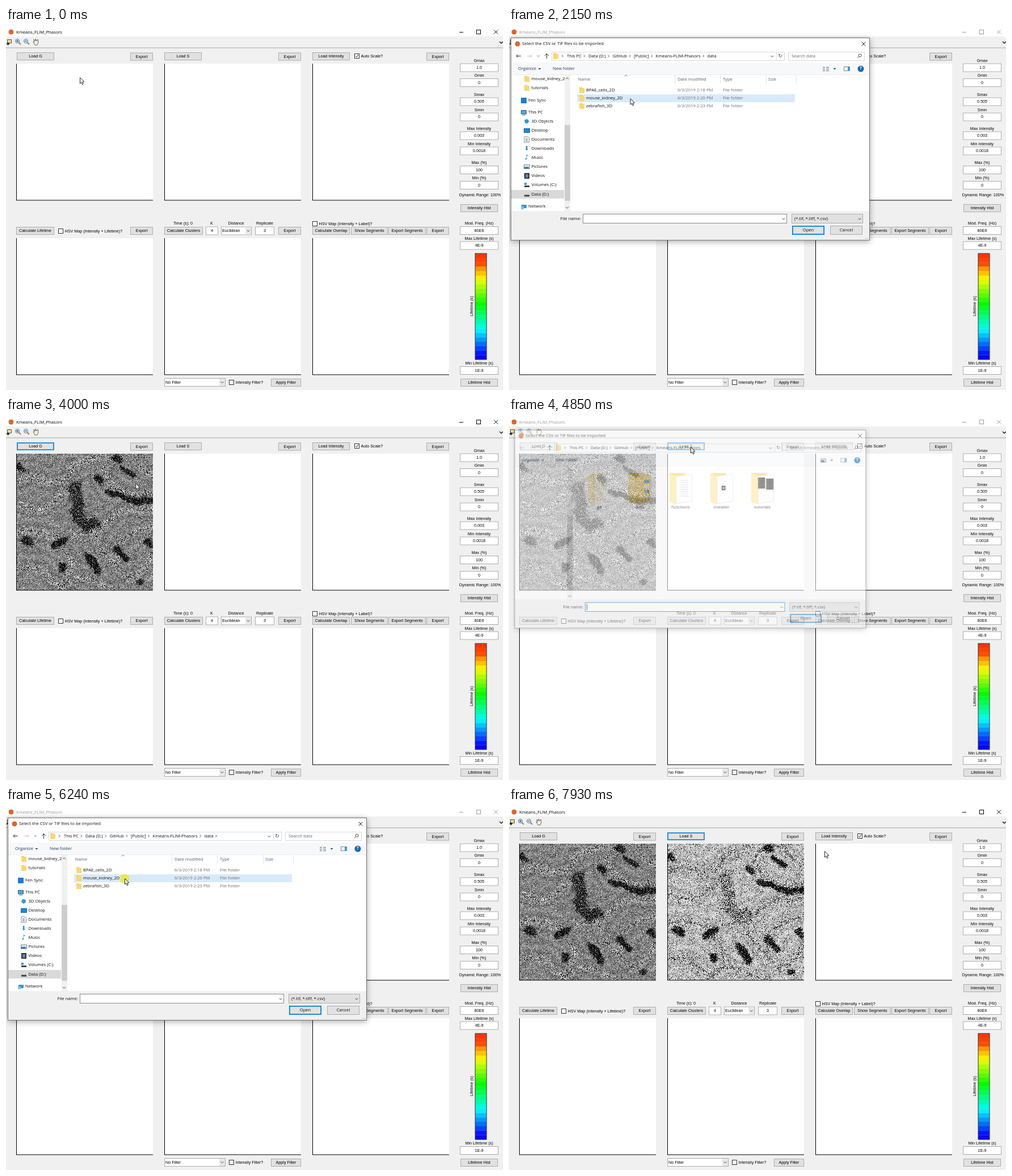
These frames come from a looping animation (876 px wide and 639 px high, 8000 ms). An HTML page with a canvas:

```html
<!DOCTYPE html>
<html lang="en">
<head>
<meta charset="utf-8">
<title>Kmeans_FLIM_Phasors</title>
<style>
html, body { margin: 0; width: 100%; height: 100%; overflow: hidden; background: #f0f0f0; }
canvas { display: block; }
</style>
</head>
<body>
<canvas id="stage" width="876" height="639"></canvas>
<script>
const LOOP = 8000;
const UI = '7.2px "Liberation Sans", Arial, sans-serif';
const SHELL = '7.65px "Open Sans", "Noto Sans", sans-serif';
const stage = document.getElementById('stage').getContext('2d');
const newLayer = (w, h = w) => Object.assign(document.createElement('canvas'), { width: w, height: h });
const layer = newLayer(876, 639);
let c = stage;

// ---------- drawing helpers ----------
function box(x, y, w, h, fill, stroke, lw = 1) {
  if (fill) { c.fillStyle = fill; c.fillRect(x, y, w, h); }
  if (stroke) {
    c.strokeStyle = stroke; c.lineWidth = lw;
    c.strokeRect(x + lw / 2, y + lw / 2, w - lw, h - lw);
  }
}
function text(s, x, y, { font = UI, align = 'left', color = '#000' } = {}) {
  c.font = font; c.textAlign = align; c.textBaseline = 'middle'; c.fillStyle = color;
  c.fillText(s, x, y);
}
const shell = (s, x, y, color = '#111', align = 'left') => text(s, x, y, { font: SHELL, color, align });
const glyph = (s, x, y, color, size = 9) =>
  text(s, x, y, { font: size + 'px "DejaVu Sans", sans-serif', align: 'center', color });
function path(points, stroke, fill, lw = 1) {
  c.beginPath();
  points.forEach(([x, y]) => c.lineTo(x, y));
  if (fill) { c.closePath(); c.fillStyle = fill; c.fill(); }
  if (stroke) { c.strokeStyle = stroke; c.lineWidth = lw; c.stroke(); }
}
function disc(x, y, r, fill, stroke) {
  c.beginPath(); c.arc(x, y, r, 0, 7);
  if (fill) { c.fillStyle = fill; c.fill(); }
  if (stroke) { c.strokeStyle = stroke; c.lineWidth = 1; c.stroke(); }
}
const down = (x, y, color = '#444', s = 2.5) => path([[x - s, y - s / 2], [x, y + s / 2], [x + s, y - s / 2]], color);
const up = (x, y, color) => down(x, y, color, -2.5);
const cross = (x, y, color) => {
  path([[x - 3.5, y - 3.5], [x + 3.5, y + 3.5]], color);
  path([[x + 3.5, y - 3.5], [x - 3.5, y + 3.5]], color);
};

// ---------- tissue images ----------
const tubules = [
  [104, 56, 107, 102, 14], [107, 102, 122, 130, 14], [122, 130, 140, 122, 12],
  [142, 43, 146, 45, 9], [5, 24, 8, 27, 9],
  [176, 7, 183, 13, 8], [188, 28, 203, 36, 7], [163, 66, 190, 78, 7], [196, 80, 241, 84, 8],
  [14, 153, 26, 158, 9], [70, 164, 84, 152, 9], [80, 199, 81, 203, 9], [125, 184, 144, 206, 10],
  [177, 168, 190, 186, 8], [231, 154, 238, 162, 7], [215, 222, 221, 226, 6]
];
const seams = [
  [0, 90, 20, 97, 50, 95, 75, 80, 88, 70],
  [0, 52, 30, 38, 62, 52, 85, 45, 100, 20, 130, 12, 150, 0],
  [135, 135, 145, 160, 172, 195, 195, 220, 225, 205, 238, 180],
  [150, 28, 170, 60, 200, 72, 241, 72],
  [150, 28, 165, 10, 205, 0, 225, 30, 241, 45],
  [0, 140, 40, 135, 70, 150, 95, 185, 100, 215, 70, 241],
  [95, 140, 135, 140, 165, 115, 200, 95, 241, 100],
  [0, 205, 40, 200, 75, 235],
  [172, 195, 180, 160, 205, 135, 241, 130],
  [100, 215, 140, 225, 170, 241]
].flatMap(p => p.slice(0, -2).flatMap((_, i) => i % 2 ? [] : [p.slice(i, i + 4)]));

function segmentDistance(x, y, [x1, y1, x2, y2]) {
  const dx = x2 - x1, dy = y2 - y1;
  const u = Math.max(0, Math.min(1, ((x - x1) * dx + (y - y1) * dy) / (dx * dx + dy * dy)));
  return Math.hypot(x - x1 - u * dx, y - y1 - u * dy);
}
function tissue(size, shade) {
  const canvas = newLayer(size), g = canvas.getContext('2d'), img = g.createImageData(size, size);
  let seed = 7;
  const rand = () => (seed = (seed * 1664525 + 1013904223) >>> 0) / 2 ** 32;
  for (let i = 0; i < size * size; i++) {
    const x0 = i % size * 241 / size, y0 = Math.floor(i / size) * 241 / size;
    const x = x0 + 2.5 * Math.sin(y0 / 8) + Math.sin(y0 / 3), y = y0 + 2.5 * Math.sin(x0 / 9) + Math.sin(x0 / 3.5);
    let dark = 0, large = false;
    tubules.forEach((tube, n) => {
      const d = Math.min(1, Math.max(0, 1.8 * (1 - segmentDistance(x, y, tube) / tube[4])));
      if (d > dark) { dark = d; large = n < 3; }
    });
    const seam = Math.min(...seams.map(s => segmentDistance(x, y, s)));
    img.data.fill(shade({ dark, large, seam, rand }), i * 4, i * 4 + 3);
    img.data[i * 4 + 3] = 255;
  }
  g.putImageData(img, 0, 0);
  return canvas;
}
const grain = rand => rand() + rand() - 1;
const imageG = tissue(241, ({ dark, large, seam, rand }) => {
  if (rand() < dark * (large ? 0.7 : 0.85)) return 35 * rand();
  const r = rand(), speckle = 0.04 + 0.3 * Math.exp(-seam / 3.5);
  if (r < speckle) return 40 * rand();
  if (r > 1 - speckle) return 210 + 45 * rand();
  return 130 + 12 * Math.sin(seam / 2.5) + 70 * grain(rand);
});
const imageS = tissue(241, ({ dark, large, seam, rand }) => {
  if (rand() < dark * (large ? 0.33 : 0.88)) return 30 * rand();
  if (rand() < 0.08 + 0.32 * Math.exp(-seam / 4)) return 60 * rand();
  return 195 + 12 * Math.sin(seam / 2.5) + 85 * grain(rand);
});
const thumbG = tissue(62, ({ dark, seam, rand }) => 165 - 115 * dark + (seam < 4 ? 25 : 0) + 45 * grain(rand));
const thumbS = tissue(62, ({ dark, seam, rand }) => 125 - 80 * dark - (seam < 4 ? 20 : 0) + 40 * grain(rand));
const thumbI = tissue(62, ({ dark, large, rand }) => large ? 255 : 255 - dark * (190 + 60 * grain(rand)));

// ---------- timing ----------
const runs = [
  { block: 1070, open: 1220, folder: 2060, crumb: 2380, files: 2770, hover: 3230, pick: 3460, active: 3620, close: 3690, end: 3850, file: 1 },
  { block: 4690, open: 4790, folder: 5640, crumb: 5850, files: 6310, hover: 6900, pick: 7310, active: 7465, close: 7545, end: 7705, file: 5 }
];
const pointer = [
  [70, 130, 87], [600, 58, 46], [1220, 58, 46], [1360, 110, 78], [1650, 214, 122], [2060, 214, 124],
  [2400, 211, 125], [3000, 211, 127], [3850, 211, 127], [4450, 320, 51], [4900, 320, 51], [5450, 214, 122],
  [5700, 209, 124], [6400, 209, 124], [7000, 510, 135], [7080, 512, 135], [7640, 512, 135], [7930, 556, 76]
];
const YELLOW = 'rgba(240,228,40,.75)', AMBER = 'rgba(245,195,45,.75)';
const clicks = [
  [680, 820, YELLOW], [1700, 1830, YELLOW], [1900, 2060, AMBER], [2460, 2610, YELLOW], [3460, 3680, AMBER],
  [4480, 4620, YELLOW], [5480, 5640, AMBER], [6230, 6310, YELLOW], [7310, 7540, AMBER]
];
function pointerAt(t) {
  const i = pointer.findIndex(k => k[0] > t);
  if (i === 0) return pointer[0].slice(1);
  if (i < 0) return pointer.at(-1).slice(1);
  const [t1, x1, y1] = pointer[i - 1], [t2, x2, y2] = pointer[i];
  const u = (t - t1) / (t2 - t1), e = u * u * (3 - 2 * u);
  return [x1 + (x2 - x1) * e, y1 + (y2 - y1) * e];
}
const within = ([x, y], x1, y1, x2, y2) => x >= x1 && x <= x2 && y >= y1 && y <= y2;

// ---------- main window ----------
function button(label, x, y, w, mode) {
  box(x, y, w, 14, mode === 'hover' ? '#e5f1fb' : '#e1e1e1', mode ? '#2b8fdb' : '#adadad', mode === 'focus' ? 2 : 1);
  text(label, x + w / 2, y + 7.5, { align: 'center' });
}
function field(label, x, y, w) {
  box(x, y, w, 15, '#fff', '#ababab');
  text(label, x + w / 2, y + 8, { align: 'center' });
}
function select(label, x, y, w) {
  box(x, y, w, 15, '#fff', '#adadad');
  box(x + w - 11, y + 1, 10, 13, '#e8e8e8');
  down(x + w - 6, y + 7.5);
  text(label, x + 2, y + 8);
}
function checkbox(label, x, y, checked) {
  box(x, y, 9, 9, '#fff', '#333');
  if (checked) path([[x + 2, y + 4.5], [x + 4, y + 6.5], [x + 7, y + 2]], '#222');
  text(label, x + 11.5, y + 5);
}
const caption = (s, x, y) => text(s, x, y, { align: 'center' });

const settings = [
  ['Gmax', '1.0', 58], ['Gmin', '0', 84.5], ['Smax', '0.505', 118], ['Smin', '0', 145],
  ['Max Intensity', '0.003', 178], ['Min Intensity', '0.0018', 205], ['Max (%)', '100', 238.5], ['Min (%)', '0', 265.5],
  ['Mod. Freq. (Hz)', '80E6', 345.5], ['Max Lifetime (s)', '4E-9', 372], ['Min Lifetime (s)', '1E-9', 592.5]
];

function mainWindow(t, run, at) {
  const ink = t >= run.block && t < run.active ? '#999' : '#000';
  box(0, 0, 876, 639, '#f0f0f0');
  box(0, 0, 876, 15, '#fff');
  disc(9, 7, 4.5, '#d9682e');
  shell('Kmeans_FLIM_Phasors', 18, 7.5, ink);
  path([[799, 7.5], [806, 7.5]], ink);
  box(829, 3, 8, 8, null, ink);
  cross(863.5, 7, ink);

  box(0, 34.5, 876, 1, '#a5a5a5');
  box(2, 20, 8, 7, '#f4dc83', '#555'); path([[1, 28], [6, 28]], '#222', null, 2); path([[3.5, 25], [3.5, 31]], '#222');
  for (const x of [20, 35]) {
    disc(x, 23, 3.5, '#d8ecfb', '#4a7fb0');
    path([[x + 2.5, 25.5], [x + 6, 29]], '#b5773a', null, 2);
    path([[x - 2, 23], [x + 2, 23]], '#246');
  }
  path([[20, 21], [20, 25]], '#246');
  path([[48, 24], [50, 25], [49, 20], [52, 23], [52, 19], [54, 23], [56, 20], [57, 25], [55, 30], [51, 30]], '#666', '#fdf0dc');
  path([[870, 24], [873, 27], [876, 24]], '#222', null, 1.5);

  for (const y of [63, 371]) for (const x of [18, 279, 540]) {
    box(x, y, 241, 241, '#fff');
    if (y === 63 && x === 18 && t >= runs[0].end) c.drawImage(imageG, x, y);
    if (y === 63 && x === 279 && t >= runs[1].end) c.drawImage(imageS, x, y);
    box(x, y, 1, 241, '#000'); box(x, y + 240.5, 241, 1, '#000');
  }

  const mode = (on, x) => on ? 'focus' : t < run.open && within(at, x, 43, x + 66, 57) ? 'hover' : '';
  button('Load G', 19, 43, 66, mode(t >= 1070 && t < 4550, 19));
  button('Load S', 279, 43, 66, mode(t >= 4550, 279));
  button('Load Intensity', 540, 43, 66);
  checkbox('Auto Scale?', 614, 45, true);
  for (const x of [219, 480, 741]) { button('Export', x, 43.5, 40); button('Export', x, 351, 40); }

  button('Calculate Lifetime', 18, 351, 67);
  checkbox('HSV Map (Intensity + Lifetime)?', 92, 354);
  caption('Time (s): 0', 312, 345.5); caption('K', 362.5, 345.5);
  caption('Distance', 405.5, 345.5); caption('Replicate', 456, 345.5);
  button('Calculate Clusters', 279, 351, 68);
  field('4', 352, 350.5, 22);
  select('Euclidean', 379, 350.5, 54);
  field('3', 439, 350.5, 34);
  checkbox('HSV Map (Intensity + Label)?', 540, 341);
  button('Calculate Overlap', 540, 351, 66);
  button('Show Segments', 608, 351, 65);
  button('Export Segments', 674, 351, 66);
  select('No Filter', 279, 618, 108);
  checkbox('Intensity Filter?', 393, 621);
  button('Apply Filter', 467, 619, 53);

  for (const [label, value, y] of settings) { caption(label, 834, y); field(value, 800, y + 4.5, 68); }
  caption('Dynamic Range: 100%', 835.5, 295.5);
  button('Intensity Hist', 801, 311, 66);
  button('Lifetime Hist', 801, 619, 66);
  for (let i = 0; i < 24; i++) {
    const hue = i < 3 ? 12 + 3 * i : Math.min(240, 36 + (i - 3) * 10.5);
    box(827, 398 + i * 7.8, 20, 8, `hsl(${hue} 96% 50%)`);
  }
  box(826.5, 397.5, 21, 188, null, '#333');
  c.save(); c.translate(821, 491); c.rotate(-Math.PI / 2); caption('Lifetime (s)', 0, 0); c.restore();
}

// ---------- file dialog ----------
const FOLDER = '#f8d775';
const smallFolder = (x, y) => { box(x - 4, y - 5, 5, 10, '#eebd4d'); box(x - 4, y - 4, 9, 9, FOLDER); };
function page(x, y) {
  path([[x - 4, y - 5], [x + 2, y - 5], [x + 4.5, y - 2.5], [x + 4.5, y + 5], [x - 4, y + 5]], '#888', '#fff');
}
const drive = (x, y) => { box(x - 4, y + 1, 9, 3, '#444'); };
const icons = {
  folder: smallFolder, page,
  sync: (x, y) => box(x - 5, y - 5, 10, 10, '#1f7ed0'),
  pc: (x, y) => { box(x - 5, y - 4, 10, 7, '#4aa9e2', '#456'); box(x - 3, y + 4, 6, 1, '#456'); },
  cube: (x, y) => glyph('⬢', x, y, '#2d9bc9', 10),
  screen: (x, y) => box(x - 5, y - 4, 11, 8, '#1e88d8', '#1667a8'),
  doc: (x, y) => { page(x, y); for (const d of [-2, 0, 2]) box(x - 2, y + d, 4, 1, '#5a87b5'); },
  arrow: (x, y) => glyph('⬇', x, y, '#2b8fdb', 11),
  note: (x, y) => glyph('♪', x, y, '#1e7fd0', 12),
  picture: (x, y) => { box(x - 5, y - 4, 11, 8, '#dcecf6', '#789'); box(x - 4, y, 8, 3, '#3f7fa8'); },
  film: (x, y) => { box(x - 4, y - 5, 9, 10, '#333'); box(x - 2, y - 3, 5, 6, '#5f86b8'); },
  system: (x, y) => { drive(x, y); box(x - 4, y - 4, 4, 4, '#2b9be0'); },
  drive,
  net: (x, y) => { box(x - 4, y - 3, 9, 6, '#3a94cf'); box(x - 5, y, 5, 5, '#7fc3e8'); }
};
const places = [
  ['mouse_kidney_2', 'folder', 90, 1], ['tutorials', 'folder', 106, 1], ['Fen Sync', 'sync', 128, 0],
  ['This PC', 'pc', 149, 0], ['3D Objects', 'cube', 165, 1], ['Desktop', 'screen', 181, 1],
  ['Documents', 'doc', 197, 1], ['Downloads', 'arrow', 213, 1], ['Music', 'note', 229, 1],
  ['Pictures', 'picture', 245, 1], ['Videos', 'film', 261, 1], ['Volumes (C:)', 'system', 277, 1],
  ['Data (D:)', 'drive', 293.5, 1], ['Network', 'net', 315, 0]
];
const column = i => 155 + i * 73.6;

function bigFolder(name, i) {
  const x = column(i);
  c.globalAlpha = name === '.git' ? 0.4 : 1;
  path([[x - 20, 95], [x + 8, 95], [x + 8, 148], [x - 20, 148]], null, '#f6d277');
  const paper = name === 'data' ? '#f9dc86' : '#fdfdfd';
  path([[x - 8, 101], [x + 20, 97], [x + 20, 146], [x - 8, 150]], '#e2ded4', paper);
  if (name === 'data') for (let k = 0; k < 4; k++) box(x + 8, 108 + k * 9, 9, 5, k % 2 ? '#fff' : '#6aa0d8');
  if (name === 'functions') for (let k = 0; k < 8; k++) box(x, 108 + k * 4, 14, 1, '#ccc');
  if (name === 'installer') { box(x, 118, 7, 8, '#333'); box(x + 2, 121, 3, 2, '#eee'); }
  if (name === 'tutorials') for (const k of [0, 1]) {
    c.drawImage(thumbS, x - 8 + k * 15, 103 + k * 2, 13, 20); box(x - 8 + k * 15, 103 + k * 2, 13, 20, 'rgba(0,0,0,.45)');
  }
  path([[x - 20, 95], [x - 8, 101], [x - 8, 152], [x - 20, 147]], null, '#fde49b');
  c.globalAlpha = 1;
  shell(name, x, 156.5, '#111', 'center');
}
function rootView(at) {
  if (within(at, 194, 86, 264, 174)) box(194, 86, 70, 78, '#e5f3ff');
  ['.git', 'data', 'functions', 'installer', 'tutorials'].forEach(bigFolder);
}
function listView(highlight) {
  [['Name', 122], ['Date modified', 297], ['Type', 377], ['Size', 457]].forEach(([s, x]) => shell(s, x, 90.5, '#4c607a'));
  for (const x of [292, 372, 453, 506]) box(x, 83, 1, 16, '#e5e5e5');
  up(206, 84, '#777');
  if (highlight) box(120, 117, 384, 14, '#d8eaf9');
  [['BPAE_cells_2D', '2:18'], ['mouse_kidney_2D', '2:20'], ['zebrafish_3D', '2:23']].forEach(([name, time], i) => {
    const y = 110 + i * 14;
    smallFolder(128, y);
    shell(name, 136, y);
    shell(`6/3/2019 ${time} PM`, 297, y, '#6d6d6d');
    shell('File folder', 377, y, '#6d6d6d');
  });
}
function filesView(t, run) {
  const thumbs = { G: thumbG, I: thumbI, S: thumbS };
  if (t >= run.hover) {
    const chosen = t >= run.pick;
    box(column(run.file) - 34.5, 86, 70, 88, chosen ? '#cce8ff' : '#e5f3ff', chosen ? '#99d1ff' : null);
  }
  for (let i = 0; i < 6; i++) {
    const x = column(i), kind = 'GIS'[i >> 1], ext = i % 2 ? 'tif' : 'csv';
    if (i % 2) {
      c.drawImage(thumbs[kind], x - 31, 88.5, 62, 62);
      if (kind === 'I') box(x - 31, 88.5, 62, 62, null, '#ddd');
    } else {
      path([[x - 20, 92], [x + 9, 92], [x + 21, 104], [x + 21, 148], [x - 20, 148]], '#8b8b8b', '#fff');
      path([[x + 9, 92], [x + 9, 104], [x + 21, 104]], '#8b8b8b', '#f1f1f1');
      box(x - 28, 105, 28, 28, '#107c41');
    }
    const long = kind === 'I';
    shell(`${kind}_5-13-2016${long ? ' sham' : ''}`, x + 0.7, 157, '#111', 'center');
    shell(`${long ? '' : 'sham '}field 4.${ext}`, x + 0.7, 167, '#111', 'center');
  }
}
function breadcrumbs(names, open) {
  let x = 102;
  c.font = SHELL;
  names.forEach((name, i) => {
    shell(name, x, 49.5);
    x += c.measureText(name).width + 12;
    if (i < names.length - 1 || open) path([[x - 8, 47.5], [x - 6, 49.5], [x - 8, 51.5]], '#444');
  });
}
function dialog(t, run, at) {
  const view = t < run.folder ? 'root' : t < run.files ? 'list' : 'files';
  const active = t < run.active, blue = '#0078d7';
  c.save();
  c.shadowColor = 'rgba(0,0,0,.35)'; c.shadowBlur = 10; c.shadowOffsetY = 2;
  box(3, 17, 633, 358, '#fff');
  c.restore();
  box(3, 17, 633, 358, '#fff', '#777');
  if (active) disc(15, 28, 4.5, '#d9682e');
  shell('Select the CSV or TIF files to be imported', active ? 23 : 9, 28);
  cross(625, 28, '#222');

  const arrow = (x, dir, color) => {
    path([[x - 4, 49.5], [x + 4, 49.5]], color);
    path([[x + dir, 46.5], [x + 4 * dir, 49.5], [x + dir, 52.5]], color);
  };
  arrow(17, -1, view === 'root' ? '#bbb' : '#333'); arrow(36, 1, '#c4c4c4'); down(52, 49.5, '#555', 1.8);
  path([[66.5, 54], [66.5, 45]], '#333'); path([[63, 49], [66.5, 45.5], [70, 49]], '#333');
  box(75, 42, 411, 16, '#fff', '#d9d9d9');
  smallFolder(82, 49.5);
  const tail = ['Data (D:)', 'GitHub', '[Public]', 'Kmeans-FLIM-Phasors'];
  if (view === 'files') { shell('«', 91, 49); breadcrumbs([...tail, 'data', 'mouse_kidney_2D']); }
  else {
    path([[93, 47.5], [95, 49.5], [93, 51.5]], '#444');
    breadcrumbs(['This PC', ...tail, ...(view === 'list' ? ['data'] : [])], view === 'list' && t >= run.crumb);
  }
  down(464, 50); box(471, 43, 1, 14, '#e2e2e2'); glyph('↻', 478, 50, '#444', 9);
  box(492, 42, 135, 16, '#fff', '#d9d9d9');
  shell('Search ' + { root: 'Kmeans-FLIM-Phasors', list: 'data', files: 'mouse_kidney_2D' }[view], 498, 49.5, '#666');
  disc(618.5, 48.5, 2.5, null, '#444'); path([[616.5, 50.5], [614, 53]], '#444');

  box(4, 61, 631, 22, '#f7f8fa'); box(4, 82, 631, 1, '#ececec');
  if (view === 'root' && within(at, 68, 60, 127, 82)) box(68, 63, 59, 18, '#e5f1fb', '#99d1ff');
  shell('Organize', 16, 72, '#1e395b'); shell('New folder', 77, 72, '#1e395b');
  const caret = x => path([[x - 2.5, 71], [x + 2.5, 71], [x, 73.5]], null, '#1e395b');
  caret(54); caret(574);
  if (view === 'list') for (const y of [69, 72, 75]) { box(553, y, 4, 1, '#567'); box(559, y, 5, 1, '#567'); }
  else { box(554, 69, 10, 7, '#dcebf5', '#567'); box(555, 72, 6, 3, '#2f5d88'); }
  box(590, 68, 11, 8, '#fff', '#6b8ba8'); box(597, 69, 3, 6, '#3a9ad9');
  disc(620, 72, 5.5, '#0e67b1'); text('?', 620, 72.3, { font: 'bold 8px "Open Sans", sans-serif', align: 'center', color: '#fff' });

  if (t >= run.open + 90) {
    box(4, 286, 93, 15, '#d9d9d9');
    for (const [label, icon, y, indent] of places) {
      const loading = t < run.open + 300 && /note|film|system|drive/.test(icon);
      icons[loading ? 'page' : icon](indent ? 31 : 26, y);
      shell(label, indent ? 39.5 : 34, y);
    }
  }
  box(98, 83, 10, 240, '#f0f0f0'); box(98, 171, 10, 134, '#cdcdcd');
  up(102.5, 89, '#444'); down(102.5, 317);

  if (view === 'root') rootView(at);
  else if (view === 'list') listView(t >= run.folder + 90);
  else filesView(t, run);

  box(4, 323, 631, 51, '#f0f0f0');
  shell('File name:', 127, 336.5, '#111', 'right');
  box(130, 328, 360, 17, '#fff', view === 'root' ? blue : '#8a8a8a');
  if (view === 'root') box(133, 331, 1, 11, '#111');
  if (t >= run.pick + 75) shell('GIS'[run.file >> 1] + '_5-13-2016 sham field 4.tif', 133, 336.5);
  down(484, 337);
  box(498, 328, 126, 17, '#e1e1e1', '#adadad');
  shell('(*.tif, *.tiff, *.csv)', 503, 336.5); down(618, 337);
  box(499, 349, 57, 16, '#e1e1e1', blue, 1.7); shell('Open', 527.5, 356.5, '#111', 'center');
  box(566, 349, 57, 16, '#e1e1e1', '#adadad'); shell('Cancel', 594.5, 356.5, '#111', 'center');
  for (let k = 0; k < 3; k++) box(632 - k * 2, 371, 1, 1, '#999');
}
function showDialog(t, run, at) {
  if (t < run.open || t >= run.end) return;
  const p = Math.min(1, 0.3 + (t - run.open) / 233, (run.end - t) / (run.end - run.close));
  c = layer.getContext('2d');
  c.clearRect(0, 0, 876, 639);
  dialog(t, run, at);
  c = stage;
  const scale = 1 - 0.035 * (1 - p) ** 0.64;
  c.save();
  c.globalAlpha = p;
  c.translate(319.5, 196); c.scale(scale, scale); c.translate(-319.5, -196);
  c.drawImage(layer, 0, 0);
  c.restore();
}

function drawPointer(t, [x, y]) {
  const click = clicks.find(([from, to]) => t >= from && t < to);
  if (click) disc(x, y + 1, 8.5, click[2]);
  c.save(); c.translate(x + 0.5, y + 0.5);
  path([[0, 0], [0, 10.5], [2.4, 8.4], [4, 12.2], [5.8, 11.4], [4.2, 7.6], [7.4, 7.4], [0, 0]], '#111', '#fff', 0.9);
  c.restore();
}

function render() {
  const t = performance.now() % LOOP;
  const run = runs[t < 4600 ? 0 : 1], at = pointerAt(t);
  mainWindow(t, run, at);
  showDialog(t, run, at);
  drawPointer(t, at);
  requestAnimationFrame(render);
}
render();
</script>
</body>
</html>
```
